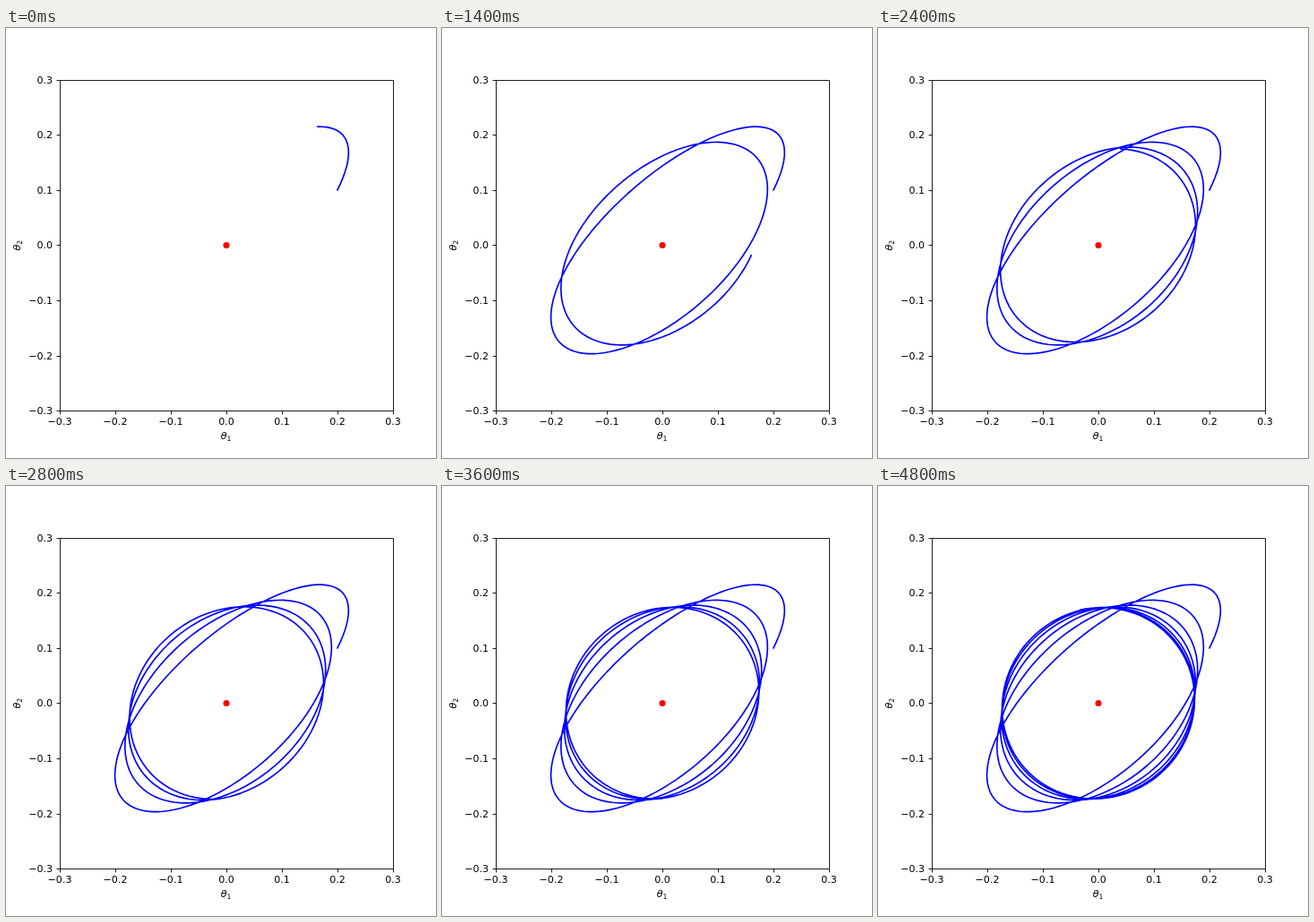
An HTML page for the animation above (4.9 s loop, 480 by 480 pixels).

```html
<!DOCTYPE html>
<html lang="en">
<head>
<meta charset="utf-8">
<title>Phase plot</title>
<style>
  html, body { margin: 0; width: 100%; height: 100%; overflow: hidden; background: #fff; }
  svg { display: block; width: 480px; height: 480px; }
  text { font: 11.11px "DejaVu Sans", sans-serif; fill: #000; }
  .theta { font-style: italic; }
  .sub { font-size: 7.78px; }
  .axes { fill: none; stroke: #000; stroke-width: 0.89; }
  .curve { fill: none; stroke: #00f; stroke-width: 1.67; stroke-linejoin: round; stroke-linecap: square; }
</style>
</head>
<body>
<svg viewBox="0 0 480 480">
  <path class="curve" id="curve"/>
  <circle cx="246" cy="242.4" r="3.5" fill="#f00"/>
  <path class="axes" id="axes"/>
  <g id="labels"></g>
  <g transform="translate(239.7 459.3)">
    <text class="theta">θ</text><text class="sub" x="6.9" y="1.8">1</text>
  </g>
  <g transform="translate(16.3 248.6) rotate(-90)">
    <text class="theta">θ</text><text class="sub" x="6.9" y="1.8">2</text>
  </g>
</svg>
<script>
const STEP_MS = 100, STEPS = 49;
const START = -Math.PI / 4;      // phase at (0.2, 0.1)
const SIZE = Math.sqrt(0.06);    // common amplitude of the sum and difference modes
const DECAY = 0.0886;            // loss of squeeze per radian

const px = x => 246 + 620 * x;
const py = y => 242.4 - 616 * y;
const byId = id => document.getElementById(id);

function addLabel(text, x, y, anchor) {
  const el = document.createElementNS("http://www.w3.org/2000/svg", "text");
  el.setAttribute("x", x);
  el.setAttribute("y", y);
  el.setAttribute("text-anchor", anchor);
  el.textContent = text;
  byId("labels").append(el);
}

function drawAxes() {
  let d = "M60.5 58.5H432.5V427.5H60.5Z";
  for (let i = -3; i <= 3; i++) {
    const x = Math.round(px(i / 10)) + 0.5;
    const y = Math.round(py(i / 10)) + 0.5;
    const text = (i < 0 ? "\u2212" : "") + (Math.abs(i) / 10).toFixed(1);
    d += `M${x} 427.5v3.9M60.5 ${y}h-3.9`;
    addLabel(text, px(i / 10), 443.3, "middle");
    addLabel(text, 52.2, Math.round(y + 3.7), "end");
  }
  byId("axes").setAttribute("d", d);
}

// An ellipse along the diagonal that relaxes into a circle.
function point(phase) {
  const squeeze = Math.log(3) / 2 * Math.exp(-DECAY * (phase - START));
  const sum = SIZE * Math.exp(squeeze) * Math.cos(phase);
  const diff = -SIZE * Math.exp(-squeeze) * Math.sin(phase);
  return px((sum + diff) / 2).toFixed(2) + " " + py((sum - diff) / 2).toFixed(2);
}

const endPhase = n => 0.8 * n + 0.293 + 0.051 * Math.exp(-n / 5);

function curvePath(end) {
  const count = Math.ceil((end - START) / 0.06);
  const pts = [];
  for (let i = 0; i <= count; i++) pts.push(point(START + (end - START) * i / count));
  return "M" + pts.join("L");
}

let shown = -1;
const begin = performance.now();
function draw() {
  const n = Math.floor(Math.max(0, performance.now() - begin) / STEP_MS) % STEPS;
  if (n !== shown) {
    byId("curve").setAttribute("d", curvePath(endPhase(n)));
    shown = n;
  }
  requestAnimationFrame(draw);
}

drawAxes();
draw();
</script>
</body>
</html>
```
